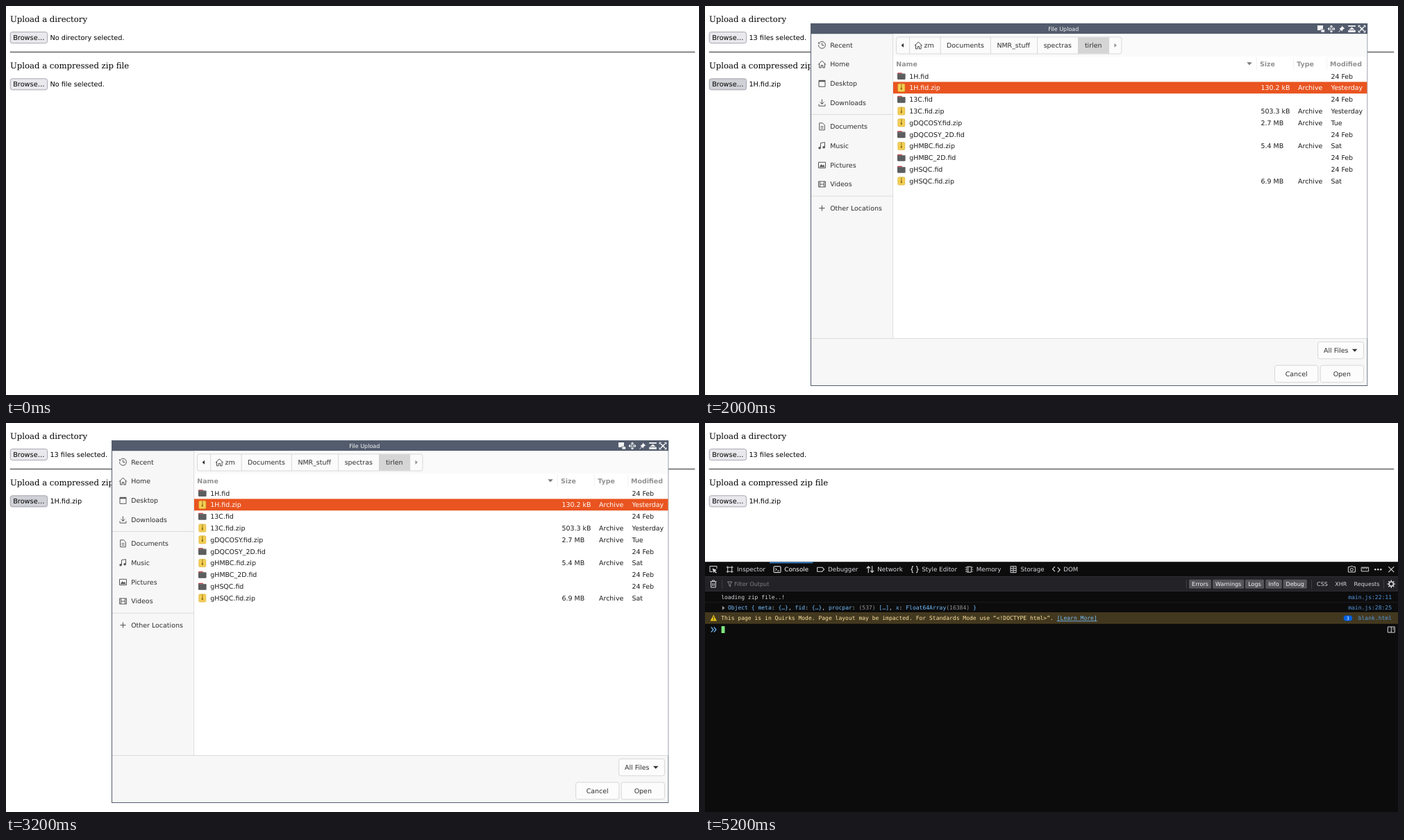
Write an HTML page that moves like this. It is 998 by 561 pixels and loops after 6 s.

```html
<!DOCTYPE html>
<html lang="en">
<head>
<meta charset="utf-8">
<title>Upload demo</title>
<style>
html, body { margin: 0; width: 100%; height: 100%; overflow: hidden; background: #fff; }
svg { display: block; width: 998px; height: 561px; }
text { font-family: "DejaVu Sans", sans-serif; white-space: pre; text-rendering: geometricPrecision; }
.serif { font-family: "DejaVu Serif", serif; }
.mono { font-family: "DejaVu Sans Mono", monospace; }
.bold { font-weight: bold; }
</style>
</head>
<body>
<svg id="stage" viewBox="0 0 998 561"></svg>
<script>
const PAGE = 9.74, GTK = 9.45, TAB = 8.77, SMALL = 8.04;

const rect = (x, y, w, h, fill, more = '') =>
  `<rect x="${x}" y="${y}" width="${w}" height="${h}" fill="${fill}" ${more}/>`;
const box = (x, y, w, h, fill, stroke, r = 3) =>
  rect(x, y, w, h, fill, `rx="${r}" stroke="${stroke}" stroke-width=".75"`);
const text = (x, y, s, size, fill = '#000', more = '') =>
  `<text x="${x}" y="${y}" font-size="${size}" fill="${fill}" ${more}>${s}</text>`;
const line = (d, stroke, w = 1, more = '') =>
  `<path d="${d}" fill="none" stroke="${stroke}" stroke-width="${w}" ${more}/>`;
const shape = (d, fill) => `<path d="${d}" fill="${fill}"/>`;
const at = (x, y, s) => `<g transform="translate(${x} ${y})">${s}</g>`;
const group = (id, s) => `<g id="${id}">${s}</g>`;
const mid = 'text-anchor="middle"', end = 'text-anchor="end"';

// Web page
const browse = (y, id) =>
  box(6.2, y, 53.4, 16.1, '#e9e9ed', '#8f8f9d').replace('<rect', `<rect id="${id}"`) +
  text(10.2, y + 11.5, 'Browse…', PAGE);

function page() {
  return text(5.9, 22.6, 'Upload a directory', 11.69, '#000', 'class="serif"') +
    text(5.9, 90, 'Upload a compressed zip file', 11.69, '#000', 'class="serif"') +
    browse(37.5, 'btnDir') + browse(104.8, 'btnZip') +
    rect(5.8, 65.7, 986.4, 1.5, '#646464') +
    text(63.4, 49, '', PAGE, '#000', 'id="dirLabel"') +
    text(63.4, 116.3, '', PAGE, '#000', 'id="zipLabel"');
}

// File chooser
const INK = '#303030';
const house = line('M-5.5 .5L0-5L5.5 .5M-3.8-1V5H-1.2V1.5H1.2V5H3.8V-1', '#4a4a4a', 1);
const places = [
  ['Recent', 56.2, line('M-4-3A5 5 0 1 1-5 0M-5-4V-2H-3M0-3V.5H3', '#555')],
  ['Home', 84, house],
  ['Desktop', 111.8, line('M-4.5-4.5H4.5V4.5H-4.5Z', '#555') + rect(-4.5, -4.5, 9, 2, '#555')],
  ['Downloads', 139.5, line('M0-5V2M-3-1L0 2L3-1M-4.5 2V4.7H4.5V2', '#555')],
  ['Documents', 173.8, line('M-3.8-5H1L3.8-2V5H-3.8ZM-2 0H2M-2 2.3H2', '#555')],
  ['Music', 201.6, line('M-2 3V-4L4-5V2', '#555') + '<g fill="#555"><circle cx="-3.4" cy="3.2" r="1.8"/><circle cx="2.6" cy="2.2" r="1.8"/></g>'],
  ['Pictures', 229.3, line('M-5-4H5V4.3H-5Z', '#555') + shape('M-4 3L-1-1L1 1L2.5-.5L4 3Z', '#555')],
  ['Videos', 257, line('M-5-4H5V4H-5ZM-3-4V4M3-4V4M-3 0H3', '#555')],
  ['Other Locations', 291.5, line('M-4 0H4M0-4V4', '#555')]
];
const files = [
  ['1H.fid', '', '24 Feb'],
  ['1H.fid.zip', '130.2 kB', 'Yesterday'],
  ['13C.fid', '', '24 Feb'],
  ['13C.fid.zip', '503.3 kB', 'Yesterday'],
  ['gDQCOSY.fid.zip', '2.7 MB', 'Tue'],
  ['gDQCOSY_2D.fid', '', '24 Feb'],
  ['gHMBC.fid.zip', '5.4 MB', 'Sat'],
  ['gHMBC_2D.fid', '', '24 Feb'],
  ['gHSQC.fid', '', '24 Feb'],
  ['gHSQC.fid.zip', '6.9 MB', 'Sat']
];
const folder = rect(-5.8, -4.8, 7, 4, '#c33b45', 'rx="1"') +
  rect(-5.8, -3.6, 11.6, 8.6, '#5c5d5e', 'rx="1.2"') + rect(-5.3, -3.4, 10.6, .7, '#858585');
const zip = rect(-5, -5.6, 10, 11.2, '#f3cf55', 'rx="1.5" stroke="#d9ac2e" stroke-width=".6"') +
  line('M0-5V-.5', '#937018', 1.6, 'stroke-dasharray="1 .7"') + rect(-1.1, -.3, 2.2, 3.2, '#937018', 'rx=".7"');

function titleIcons() {
  const c = '#f2f3f5';
  return at(887, 33, rect(-5, -5, 8, 7, c) + rect(0, 1, 5.5, 4, c, 'stroke="#535c6d" stroke-width=".7"')) +
    at(902, 33, shape('M0-5.5L2.4-3H-2.4ZM0 5.5L2.4 3H-2.4ZM-5.5 0L-3-2.4V2.4ZM5.5 0L3-2.4V2.4Z', c) +
      line('M-1.7-1.7H1.7V1.7H-1.7Z', c)) +
    at(917, 33, shape('M0-4.5L4.3-.5L2.7 0L1 2L.5 3.5L-3.5-.3L-2-1L0-3Z', c) + line('M-1.3 1.3L-4.5 4.5', c)) +
    at(931.5, 33, rect(-5.3, -5, 10.6, 1.8, c) + shape('M0-2.5L4 1H-4Z', c) + rect(-5.3, 1.8, 10.6, 3, c)) +
    at(946, 33, line('M-3-3L3 3M3-3L-3 3', c, 1.7) +
      shape('M-5.3-5.3H-1.8L-5.3-1.8ZM5.3-5.3V-1.8L1.8-5.3ZM-5.3 5.3V1.8L-1.8 5.3ZM5.3 5.3H1.8L5.3 1.8Z', c));
}

function pathBar() {
  const crumbs = [[315.5, 'zm'], [348, 'Documents'], [420.4, 'NMR_stuff'], [487.7, 'spectras'], [546.9, 'tirlen']];
  return box(275.4, 44.8, 324.6, 24.2, '#fbfbfb', '#cdcdcd') +
    rect(537.5, 45.2, 44, 23.4, '#d5d5d5') +
    line('M294.6 45V69M339.2 45V69M411.3 45V69M478.6 45V69M537.5 45V69M581.6 45V69', '#cdcdcd', .75) +
    shape('M286 53.8V59.8L282.6 56.8Z', INK) + shape('M589.5 53.8V59.8L592.9 56.8Z', '#929292') +
    at(307.3, 56.8, house) + crumbs.map(([x, s]) => text(x, 60.2, s, GTK, INK)).join('');
}

function fileRow([name, size, date], i) {
  const y = 101 + i * 16.83, on = i === 1, fill = on ? '#fff' : '#1c1c1c';
  return (on ? rect(271, y - 8.4, 682.4, 16.8, '#e95420') : '') +
    at(282.8, y, size ? zip : folder) +
    text(294.3, y + 3.5, name, GTK, fill) + text(901.4, y + 3.5, date, GTK, fill) +
    (size ? text(800.5, y + 3.5, size, GTK, fill) + text(854, y + 3.5, 'Archive', GTK, fill) : '');
}

function dialog() {
  const heads = [[275.3, 'Name'], [799, 'Size'], [852.3, 'Type'], [900, 'Modified']];
  const buttons = [[820.6, 518.2, 62.2, 'Cancel'], [886.2, 518.2, 62.2, 'Open'], [882.6, 484.4, 65.8, '']];
  return rect(152, 25, 802.2, 523, '#535c6d') + rect(153, 40.2, 800.4, 506.8, '#f7f7f7') +
    text(516.3, 35.9, 'File Upload', SMALL, '#f4f5f6', mid) + titleIcons() +
    rect(271, 40.2, 682.4, 33, '#fafafa') + rect(271, 73, 682.4, 406.3, '#fff') +
    line('M270.6 40.2V479.3M153 156.5H270.6M153 274.2H270.6M153 479.5H953.4', '#d3d3d3', .75) +
    places.map(([s, y, icon]) => at(168.5, y, icon) + text(180.2, y + 3.4, s, GTK, INK)).join('') +
    pathBar() +
    heads.map(([x, s]) => text(x, 86.7, s, GTK, '#929292', 'class="bold"')).join('') +
    line('M794.6 74V92M847.6 74V92M895.6 74V92', '#ececec', .75) +
    shape('M780.3 81.3H787.7L784 85.2Z', '#777') +
    files.map(fileRow).join('') +
    buttons.map(([x, y, w, s]) => box(x, y, w, 24.4, '#fcfcfc', '#cdcdcd') +
      text(x + w / 2, y + 15.6, s, GTK, INK, mid)).join('') +
    text(891, 500, 'All Files', GTK, INK) + shape('M932 494.7H939.4L935.7 498.8Z', INK);
}

// Developer tools
const PALE = '#d7d7db', EDGE = '#38383d', BLUE = '#75bfff', LINK = '#5397dc';
const tabs = [
  [46, 'Inspector', line('M-3-3H3V3H-3ZM-3-5V-3H-5M3-5V-3H5M-3 5V3H-5M3 5V3H5', PALE)],
  [114.3, 'Console', line('M-4-4.4H4Q5-4.4 5-3.4V3.4Q5 4.4 4 4.4H-4Q-5 4.4-5 3.4V-3.4Q-5-4.4-4-4.4ZM-2.7-1.8L-.7 0L-2.7 1.8M.3 2H2.7', '#fff')],
  [177, 'Debugger', line('M-5-3H2L5 0L2 3H-5Z', PALE, 1.1, 'stroke-linejoin="round"')],
  [248.3, 'Network', line('M-2.7 5V-4M-5.2-1.7L-2.7-4.3L-.2-1.7M2.7-5V4M.2 1.7L2.7 4.3L5.2 1.7', PALE, 1.1)],
  [312.3, 'Style Editor', line('M-2-4.6Q-3.7-4.6-3.7-3V-1.2L-5 0L-3.7 1.2V3Q-3.7 4.6-2 4.6M2-4.6Q3.7-4.6 3.7-3V-1.2L5 0L3.7 1.2V3Q3.7 4.6 2 4.6', PALE, 1.1)],
  [390.7, 'Memory', line('M-3-4H3V4H-3ZM-5.5-3H-4M-5.5 0H-4M-5.5 3H-4M5.5-3H4M5.5 0H4M5.5 3H4', PALE) + line('M-1-4V4', PALE, .8)],
  [454.4, 'Storage', line('M-4-4.5H4V4.5H-4ZM-4-1.5H4M-4 1.5H4M-1-3H1M-1 0H1M-1 3H1', PALE)],
  [516.2, 'DOM', line('M-2-4L-5.3-.5L-2 3M2-3L5.3 .5L2 4', PALE, 1.2)]
];
const pills = [[697, 32, 'Errors'], [731.2, 45, 'Warnings'], [778, 27, 'Logs'], [807.3, 23.4, 'Info'], [832.6, 34.2, 'Debug']];
const kinds = [[889, 'CSS'], [915.8, 'XHR'], [953, 'Requests']];

function toolIcons() {
  const spokes = Array.from({ length: 8 }, (_, i) =>
    `<path d="M0-3V-5.7" stroke="${PALE}" stroke-width="1.4" transform="rotate(${i * 45})"/>`).join('');
  return at(12, 211, line('M-1 3.5H-5V-4.5H5V-1', PALE) + shape('M-1.5-1.5L5 1L2.5 2.2L5 4.7L4 5.7L1.5 3.2L.5 5.5Z', PALE)) +
    at(931.4, 211, line('M-5-3.5H-2L-1.3-4.6H1.3L2-3.5H5V4H-5Z', PALE) + `<circle r="2" cy=".3" fill="none" stroke="${PALE}"/>`) +
    at(950.4, 211, line('M-5.2-2.8H5.2V2.8H-5.2ZM-2.6-2.8V0M0-2.8V-.5M2.6-2.8V0', PALE)) +
    [-4, 0, 4].map(x => `<circle cx="${969.3 + x}" cy="211.2" r="1.3" fill="${PALE}"/>`).join('') +
    at(988.3, 211.2, line('M-4-4L4 4M4-4L-4 4', PALE, 1.1)) +
    at(12, 232, line('M-4.5-3.3H4.5M-1.5-3.5V-5H1.5V-3.5M-3.4-3V5H3.4V-3M-1.2-1V3M1.2-1V3', PALE)) +
    at(35.7, 232.3, line('M-3.2-3.3H3.2L.9 0V3.6L-.9 2.5V0Z', '#939395', .9)) +
    at(988.3, 232.2, spokes + `<circle r="3.1" fill="none" stroke="${PALE}" stroke-width="1.5"/>`) +
    at(988.3, 298, line('M-5-4H5V4H-5ZM0-4V4', PALE) + line('M2-2H4M2 0H4', PALE, .8));
}

function devtools() {
  const mono = 'class="mono"', monoEnd = mono + ' ' + end;
  const gray = s => `<tspan fill="#939395">${s}</tspan>`;
  const white = s => `<tspan fill="${PALE}">${s}</tspan>`;
  const object = `Object { meta${white(':')} {…}${white(',')} fid${white(':')} {…}${white(',')} procpar${white(':')} ` +
    `${gray('(537)')} […]${white(',')} x${white(':')} Float64Array${gray('(16384)')} }`;
  return rect(0, 200.2, 998, 360.8, '#0c0c0d') +
    rect(0, 221.6, 998, 20.8, '#232327') +
    rect(0, 273.6, 998, 15.4, '#42381f') +
    line('M0 200.6H998M0 221.6H998M0 242.4H998', EDGE, .75) +
    line('M0 258.4H998', '#222225', .75) + line('M0 273.6H998M0 289H998', '#5a4b25', .75) +
    rect(93, 200.6, 62.3, 1.6, '#3c93e4') +
    line('M24.8 226V239M693.4 226V239M873.6 226V239M977.6 226V239', '#4a4a4f', .75) +
    tabs.map(([x, s, icon]) => at(x - 10.3, 211.2, icon) +
      text(x, 214.3, s, TAB, s === 'Console' ? '#fff' : PALE)).join('') +
    toolIcons() +
    text(42, 235.3, 'Filter Output', SMALL, '#818185') +
    pills.map(([x, w, s]) => rect(x, 225.8, w, 13, '#56565a', 'rx="1.5"') +
      text(x + w / 2, 235.3, s, SMALL, '#f4f4f5', mid)).join('') +
    kinds.map(([x, s]) => text(x, 235.3, s, SMALL, PALE, mid)).join('') +
    text(23.2, 253.6, 'loading zip file..!', SMALL, PALE, mono) +
    text(989, 253.6, 'main.js:22:11', SMALL, LINK, monoEnd) +
    shape('M24.8 263.8L28.6 266.8L24.8 269.8Z', '#939395') +
    text(32.9, 269, object, SMALL, BLUE, mono) +
    text(989, 269, 'main.js:28:25', SMALL, LINK, monoEnd) +
    shape('M12.3 276.5L17 285.4H7.6Z', '#e8c51c') + rect(11.7, 279.3, 1.2, 3, '#42381f') + rect(11.7, 283, 1.2, 1.2, '#42381f') +
    text(23.2, 284.3, 'This page is in Quirks Mode. Page layout may be impacted. For Standards Mode use “&lt;!DOCTYPE html&gt;”. ' +
      `<tspan fill="${BLUE}" text-decoration="underline">[Learn More]</tspan>`, SMALL, '#fce2a1', mono) +
    rect(919.6, 277.6, 12.6, 8, '#0060df', 'rx="4"') + text(925.9, 284, '3', 6.6, '#fff', mid) +
    text(989, 284.3, 'blank.html', SMALL, LINK, monoEnd) +
    line('M8.8 294.4L12 298L8.8 301.6M12.8 294.4L16 298L12.8 301.6', BLUE, 1.2) +
    rect(23.6, 293, 4.9, 10, '#7fe77f');
}

const $ = id => document.getElementById(id);
$('stage').innerHTML = rect(0, 0, 998, 561, '#fff') + page() + group('dialog', dialog()) + group('tools', devtools());

function show(ms) {
  const step = Math.floor(ms % 6000 / 2000);
  $('dirLabel').textContent = step ? '13 files selected.' : 'No directory selected.';
  $('zipLabel').textContent = step ? '1H.fid.zip' : 'No file selected.';
  $('btnZip').setAttribute('fill', step === 1 ? '#d0d0d7' : '#e9e9ed');
  $('dialog').style.display = step === 1 ? '' : 'none';
  $('tools').style.display = step === 2 ? '' : 'none';
}

const start = performance.now();
function tick() {
  show(performance.now() - start);
  requestAnimationFrame(tick);
}
show(0);
requestAnimationFrame(tick);
</script>
</body>
</html>
```
